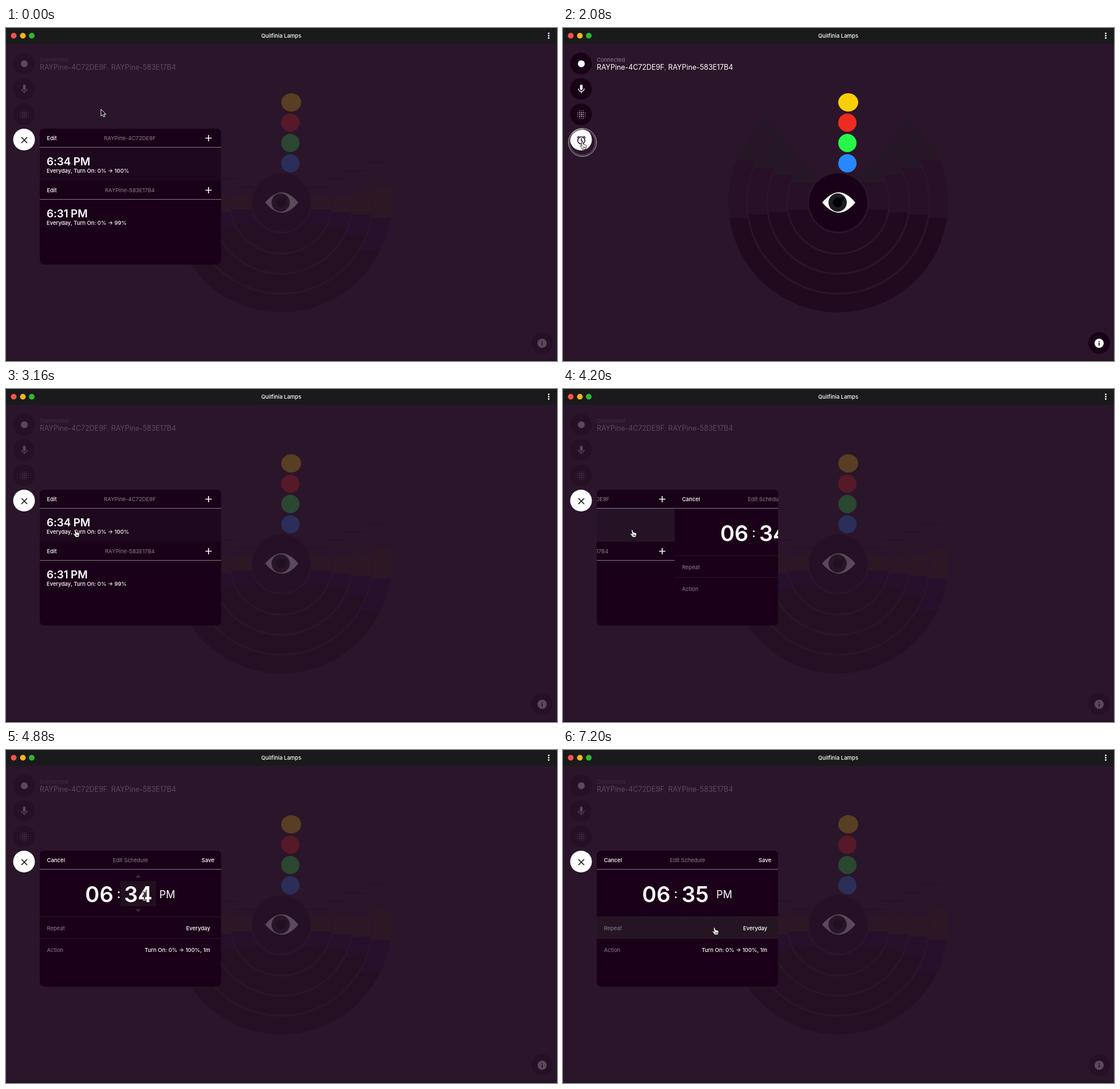
Write an HTML page that moves like this. It is 963x582 px and loops after 8 s.

```html
<!DOCTYPE html>
<html lang="en">
<head>
<meta charset="utf-8">
<title>Lamp schedule</title>
<style>
  html, body { margin: 0; width: 100%; height: 100%; overflow: hidden; background: #2b152a; }
  svg { display: block; width: 100%; height: 100%; }
  text { font-family: Inter, Roboto, sans-serif; font-size: 9.5px; font-weight: 500; fill: #fff; }
  .muted { fill: #8b808a; font-weight: 400; }
  .time { font-size: 19px; font-weight: 600; letter-spacing: -.2px; }
  .digits { font-size: 38px; font-weight: 600; }
</style>
</head>
<body>
<svg id="stage" viewBox="0 0 963 582"></svg>
<script>
const LOOP = 8000;
const CX = 481, CY = 305;
const PANEL_W = 317;
const DEVICES = ['RAYPine-4C72DE9F', 'RAYPine-583E17B4'];
const CLICKS = [20, 2080, 3520, 5860];

// Cursor moves: start, end, x, y
const MOVES = [
  [840, 1320, 34, 200],
  [2900, 3160, 121.5, 247],
  [4300, 4880, 242, 255],
  [5100, 5500, 234, 229],
  [6820, 7200, 265, 311]
];

const clamp = v => Math.max(0, Math.min(1, v));
const span = (t, a, b) => clamp((t - a) / (b - a));
const easeOut = x => 1 - (1 - x) ** 3;
const smooth = x => x * x * (3 - 2 * x);

const circle = (x, y, r, fill, more = '') => `<circle cx="${x}" cy="${y}" r="${r}" fill="${fill}" ${more}/>`;
const rect = (x, y, w, h, fill, more = '') => `<rect x="${x}" y="${y}" width="${w}" height="${h}" fill="${fill}" ${more}/>`;
const text = (x, y, s, more = '') => `<text x="${x}" y="${y}" ${more}>${s}</text>`;
const END = 'text-anchor="end"';
const MID = 'text-anchor="middle"';

// Annulus, open at the top by 40 degrees on each side
function annulus(r0, r1) {
  const a = 40 * Math.PI / 180;
  const at = (r, side) => `${CX + side * r * Math.sin(a)} ${CY - r * Math.cos(a)}`;
  return `M${at(r1, 1)}A${r1} ${r1} 0 1 1 ${at(r1, -1)}L${at(r0, -1)}A${r0} ${r0} 0 1 0 ${at(r0, 1)}Z`;
}

const RINGS = [
  { r0: 54, r1: 88, top: 293, cut: 317, low: 342 },
  { r0: 91, r1: 123, top: 293, cut: 322, low: 350 },
  { r0: 126, r1: 158, top: 290, cut: 326, low: 363 },
  { r0: 161, r1: 192, top: 279, cut: 332, low: 388 }
];

function bands(i, list) {
  const parts = list.map(([y0, y1, fill]) => rect(285, y0, 392, y1 - y0, fill)).join('');
  return `<g clip-path="url(#ring${i})">${parts}</g>`;
}

const ringClips = RINGS.map((r, i) => `<clipPath id="ring${i}"><path d="${annulus(r.r0, r.r1)}"/></clipPath>`).join('');

const idleRings = RINGS.map((r, i) => bands(i, [
  [150, 270 - i * 13, '#261726'],
  [270 - i * 13, r.cut, '#281026'],
  [r.cut, 500, '#210a1e']
])).join('');

const dimRings = RINGS.map((r, i) => bands(i, [
  [r.top, r.cut, '#2d1724'],
  [r.cut, r.low, '#26102c'],
  [r.low, 500, '#251023']
])).join('') + [0, 1, 2, 3].map(i => {
  const x = 526 + i * 33, y = 277 - i * 14.5;
  return rect(x, y, 36, 3, '#27122b') + rect(2 * CX - x - 36, y, 36, 3, '#27122b');
}).join('');

function dotGrid() {
  let s = '';
  for (let i = -2; i <= 2; i++)
    for (let j = -2; j <= 2; j++)
      if (Math.abs(i * j) < 4) s += circle(32 + i * 3.3, 151.5 + j * 3.3, 1.1 - .25 * Math.max(Math.abs(i), Math.abs(j)), '#fff');
  return s;
}

const DARK = '#190218';
const mic = `<rect x="29.7" y="99" width="4.6" height="9.5" rx="2.3" fill="#fff"/>
  <path d="M27 106a5 5 0 0 0 10 0M32 111v3" fill="none" stroke="#fff" stroke-width="1.4"/>`;
const alarm = `<circle cx="32" cy="196.5" r="6.2"/><path d="M32 192.8v4l2.8 1.8M24.6 192l3.6-3M39.4 192l-3.6-3"/>`;
const eye = circle(CX, CY, 51, DARK) +
  `<path d="M453 305Q468 287.3 482 287.3T511 305Q496 322.7 482 322.7T453 305Z" fill="#fff"/>` +
  circle(480, 305, 16, '#1c1d22') + circle(480, 305, 8.5, '#000') + circle(488.5, 298, 3, '#08080a');

const scene = [62, 106.5, 151].map(y => circle(31.5, y, 19, DARK)).join('') +
  circle(32, 62.5, 6, '#fff') + mic + dotGrid() +
  text(59, 58.5, 'Connected', 'class="muted"') +
  text(59, 73, DEVICES.join('<tspan fill="#8b808a">, </tspan>'), 'style="font-size:12.4px;font-weight:400"') +
  `<ellipse cx="498.5" cy="130" rx="17.5" ry="16" fill="#f9cf08"/>` +
  circle(497, 165.5, 16, '#ee2b20') + circle(497, 201, 16, '#26f64a') + circle(497, 236.5, 16, '#2788ff') +
  eye + circle(937, 550.5, 19, DARK) + circle(937, 551, 8, '#fff') +
  rect(936.1, 550, 1.8, 5, DARK) + rect(936.1, 547, 1.8, 1.8, DARK);

const plus = (x, y) => `<path d="M${x - 5.5} ${y}h11M${x} ${y - 5.5}v11" stroke="#fff" stroke-width="1.6"/>`;
const header = y => rect(59, y, PANEL_W, 32, '#190118') + rect(59, y + 32, PANEL_W, 1, '#857a84');

function deviceList(y, name, time, note) {
  return header(y) + text(71.5, y + 20, 'Edit') + text(216.5, y + 20, name, `class="muted" ${MID}`) +
    plus(354, y + 16.5) + text(71, y + 63.5, time, 'class="time"') + text(71, y + 77, note);
}

const list = rect(59, 176, PANEL_W, 238, '#1a0018') + rect(59, 208, PANEL_W, 60, '#1e081d') +
  rect(59, 208, PANEL_W, 60, '#251325', 'id="rowHover"') +
  deviceList(176, DEVICES[0], '6:34 PM', 'Everyday, Turn On: 0% → 100%') +
  deviceList(267, DEVICES[1], '6:31 PM', 'Everyday, Turn On: 0% → 99%');

const edit = rect(59, 176, PANEL_W, 238, '#1a0018') + header(176) +
  text(71.5, 196, 'Cancel') + text(217.5, 196, 'Edit Schedule', `class="muted" ${MID}`) + text(364, 196, 'Save', END) +
  rect(59, 291, PANEL_W, 39, '#251523', 'id="repeatHover"') +
  rect(59, 291, PANEL_W, 1, '#2a1428') + rect(59, 329, PANEL_W, 1, '#2a1428') +
  `<g id="field">${rect(-31, 229, 62, 44, '#22101f')}</g>
   <g id="steps"><path id="up" d="M-5 223L0 218 5 223Z"/><path d="M-5 278L0 283 5 278Z" fill="#3a2838"/></g>` +
  text(163, 266, '06', `class="digits" ${MID}`) +
  text(197, 259, ':', `style="font-size:22px" ${MID}`) +
  text(231, 266, '34', `class="digits" id="minutes" ${MID}`) +
  text(268, 258.5, 'PM', 'style="font-size:18px;font-weight:400"') +
  text(71.5, 314.5, 'Repeat', 'class="muted"') + text(357, 314.5, 'Everyday', END) +
  text(71.5, 352.5, 'Action', 'class="muted"') + text(357, 352.5, 'Turn On: 0% → 100%, 1m', END);

const cursors = `
  <path id="arrow" d="M0 0V12L2.8 9.4 4.8 13.6 6.8 12.7 4.9 8.6H8.6Z" fill="#000" stroke="#fff"/>
  <g id="hand" stroke="#000" stroke-width=".8"><path d="M-2 -.4Q-.6 -1.6 .4 0L2 4Q3.2 3 4 4.2 5.2 3.5 5.8 4.8 7.2 4.5 7 6.5L6.5 9.5 5.5 12H-.2L-1 10 -4 6.6Q-3.6 5 -2 5.8L-.6 6.8Z" fill="#fff"/>
  <path d="M1.4 7.5v2.6M3 7.5v2.6M4.6 7.5v2.6"/></g>
  <g id="beam" fill="none"><path d="M-3 -7Q0 -7 0 -5V5Q0 7 -3 7M3 -7Q0 -7 0 -5V5Q0 7 3 7M-2 2H2" stroke="#fff" stroke-width="2.4"/>
  <path d="M-3 -7Q0 -7 0 -5V5Q0 7 -3 7M3 -7Q0 -7 0 -5V5Q0 7 3 7M-2 2H2" stroke="#000"/></g>`;

document.getElementById('stage').innerHTML = `
  <defs>${ringClips}<clipPath id="panelClip"><rect x="59" y="176" width="${PANEL_W}" height="237.5" rx="8"/></clipPath></defs>
  ${rect(0, 0, 963, 582, '#2b152a')}
  <g id="idle">${idleRings}</g><g id="dim">${dimRings}</g>
  <g id="scene">${scene}</g>
  ${rect(0, 580, 963, 2, '#1f0e1f')}${rect(0, 0, 963, 28, '#1a1a1d')}
  ${circle(13.5, 13.5, 5, '#fb5245')}${circle(29.5, 13.5, 5, '#f4b41e')}${circle(45, 13.5, 5, '#2fb82d')}
  ${text(481, 17, 'Quilfinia Lamps', MID)}
  ${[9.5, 13.5, 17.5].map(y => circle(948.5, y, 1.4, '#fff')).join('')}
  <g id="panel"><g clip-path="url(#panelClip)"><g id="list">${list}</g><g id="edit">${edit}</g></g></g>
  ${circle(31.5, 195, 19, DARK)}${circle(31.5, 195, 19, '#fff', 'id="lit"')}
  <g id="alarm" fill="none" stroke-width="1.5">${alarm}</g>
  <path id="cross" d="M27 191l10 10M37 191l-10 10" stroke="#111" stroke-width="1.6"/>
  <g id="ring" fill="none"><circle r="24.5" stroke="#c9c4c9"/><circle r="23.2" stroke="#2a1a2a"/><circle r="22.2" stroke="#8f858e" stroke-width=".8"/></g>
  <g id="cursor">${cursors}</g>`;

const el = {};
document.querySelectorAll('[id]').forEach(n => el[n.id] = n);
const set = (id, name, value) => el[id].setAttribute(name, value);
const fade = (id, v) => set(id, 'opacity', v);
const shift = (id, x, y = 0) => set(id, 'transform', `translate(${x} ${y})`);

function cursorAt(t) {
  let x = 166, y = 142;
  for (const [a, b, tx, ty] of MOVES) {
    const p = smooth(span(t, a, b));
    x += (tx - x) * p;
    y += (ty - y) * p;
  }
  return [x, y];
}

function draw(t) {
  const open = t < 2080 ? 1 - easeOut(span(t, 20, 440)) : easeOut(span(t, 2100, 2520));
  const [x, y] = cursorAt(t);
  const onButton = Math.hypot(x - 31.5, y - 195) < 19;
  const lit = Math.max(open, onButton ? 1 : 0);

  fade('scene', 1 - .78 * open);
  fade('idle', 1 - open);
  fade('dim', open);
  fade('panel', open);
  const k = .9 + .1 * open;
  set('panel', 'transform', `translate(${59 * (1 - k)} ${195 * (1 - k)}) scale(${k})`);
  fade('lit', lit);
  fade('cross', open);
  fade('alarm', 1 - open);
  set('alarm', 'stroke', lit > .5 ? '#190218' : '#fff');

  const slide = easeOut(span(t, 4052, 4660));
  shift('list', -PANEL_W * slide);
  shift('edit', PANEL_W * (1 - slide));
  fade('rowHover', span(t, 3520, 3680));
  fade('repeatHover', y > 291 && t > 6820 ? 1 : 0);

  // Hovered time column
  const editing = t > 4300;
  const inRow = editing && y > 215 && y < 285;
  const column = inRow && x > 132 && x < 194 ? 163 : inRow && x > 200 && x < 262 ? 231 : 0;
  const onUp = column && y < 231;
  const typing = column && y >= 231 && y < 273;
  shift('field', column);
  shift('steps', column);
  fade('field', typing ? 1 : 0);
  fade('steps', column ? 1 : 0);
  set('up', 'fill', onUp ? '#fff' : '#3a2838');
  el.minutes.textContent = t < 5880 ? '34' : '35';

  const overRow = t >= 2520 && !editing && x > 59 && y > 209;
  const hand = onButton || overRow || onUp || (editing && y > 291);
  fade('hand', hand ? 1 : 0);
  fade('beam', typing ? 1 : 0);
  fade('arrow', hand || typing ? 0 : 1);
  shift('cursor', x, y);

  const click = CLICKS.find(c => t >= c && t < c + 170);
  fade('ring', click === undefined ? 0 : 1 - span(t, click + 50, click + 170));
  shift('ring', x, y);
}

const start = performance.now();
function tick() {
  draw((performance.now() - start) % LOOP);
  requestAnimationFrame(tick);
}
draw(0);
requestAnimationFrame(tick);
</script>
</body>
</html>
```
